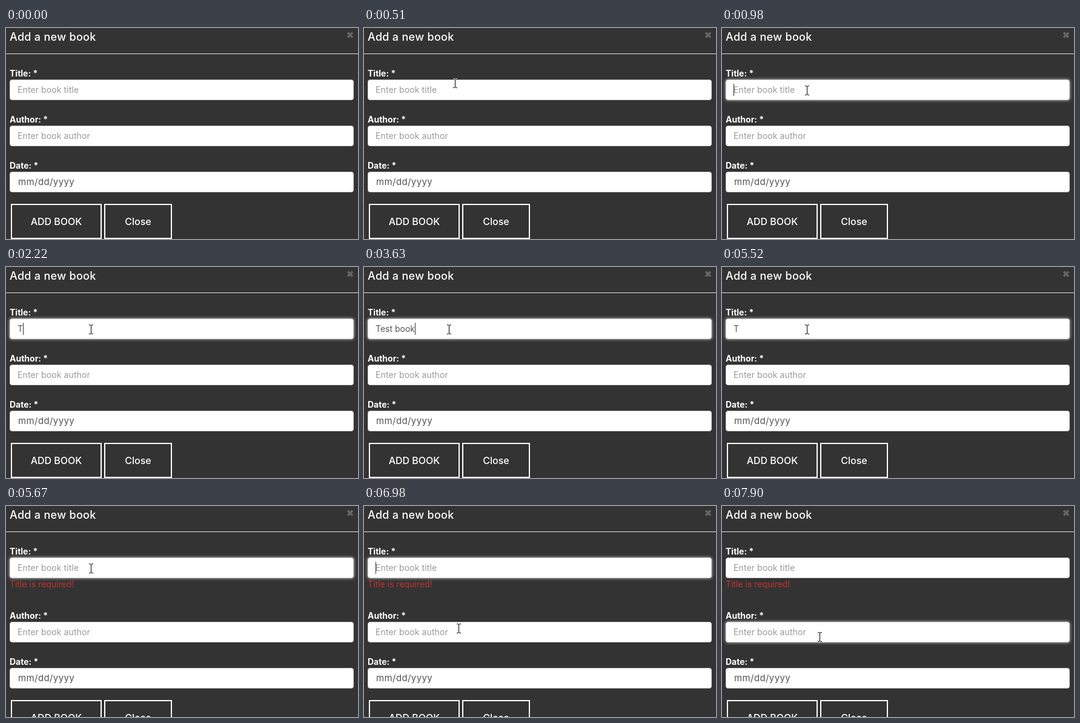
Animation, 581 px wide and 348 px high, one loop 8 s. Source, as an HTML page:

```html
<!DOCTYPE html>
<html lang="en">
<head>
<meta charset="utf-8">
<title>Add a new book</title>
<style>
  html, body { margin: 0; width: 100%; height: 100%; overflow: hidden; background: #333; }
  svg { display: block; }
  text { font: 14px Inter, sans-serif; fill: #fff; white-space: pre; }
  .heading { font-size: 18px; font-weight: 500; letter-spacing: .3px; }
  .label { font-weight: 700; }
  .hint { fill: #999; letter-spacing: .1px; }
  .value { fill: #555; }
  .date { fill: #555; font-size: 15px; letter-spacing: .4px; }
  .error { fill: #c43232; }
  .button { font-size: 16px; font-weight: 500; }
  .box { fill: #fff; stroke: #ccc; }
  .glow { fill: #fff; filter: blur(2.5px); opacity: 0; }
  .frame { fill: none; stroke: #fff; stroke-width: 2; }
  #beam { fill: none; stroke: #fff; mix-blend-mode: difference; }
</style>
</head>
<body>
<svg width="581" height="348" viewBox="0 0 581 348">
  <rect width="581" height="348" fill="#333"/>
  <text class="heading" x="6" y="21">Add a new book</text>
  <path d="M564 7.5l8 8m0-8l-8 8" stroke="#666" stroke-width="3.6"/>
  <path d="M0 42.5h581" stroke="#e5e5e5"/>
  <g id="title"></g>
  <text class="error" id="error" x="6" y="134">Title is required!</text>
  <g id="lower">
    <g id="author" transform="translate(0 76)"></g>
    <g id="date" transform="translate(0 152)"></g>
    <rect class="frame" x="9" y="291" width="148" height="56"/>
    <text class="button" x="83" y="324.5" text-anchor="middle">ADD BOOK</text>
    <rect class="frame" x="163" y="291" width="110" height="56"/>
    <text class="button" x="218" y="324.5" text-anchor="middle">Close</text>
  </g>
  <text class="value" id="typed" x="19" y="107"></text>
  <rect id="caret" width="1" height="20" fill="#333"/>
  <path id="beam" d="M-3 -7.5H-1L.5 -6.5 2 -7.5H4M.5 -7V7M-3 7.5H-1L.5 6.5 2 7.5H4"/>
  <path id="arrow" d="M.5 .5V16.5L4 13.2 6.5 18.6 8.8 17.6 6.4 12.3H11.5Z" fill="#fff" stroke="#000"/>
</svg>
<script>
const LOOP = 8000, FRAME = 77.8, START = 120;
const TITLE_CLICK = 830, AUTHOR_CLICK = 7290, EMPTIED = 5665;
const TITLE = 'Test book';
const el = id => document.getElementById(id);

function addField(id, label, hint, hintClass, hintX) {
  el(id).innerHTML = `
    <text class="label" x="6" y="80">${label}: *</text>
    <rect class="glow" x="6" y="85" width="568" height="34" rx="4"/>
    <rect class="box" x="6.5" y="85.5" width="567" height="33" rx="3.5"/>
    <text class="${hintClass}" x="${hintX}" y="107">${hint}</text>`;
}
addField('title', 'Title', 'Enter book title', 'hint', 19);
addField('author', 'Author', 'Enter book author', 'hint', 19);
addField('date', 'Date', 'mm/dd/yyyy', 'date', 20);

const titleHint = el('title').querySelector('.hint');
const titleGlow = el('title').querySelector('.glow');
const authorGlow = el('author').querySelector('.glow');

// Pointer stops: time, x, y
const stops = [
  [120, 190, 242], [509, 150, 91], [590, 147, 67], [745, 140, 103],
  [6520, 140, 103], [7130, 160, 223], [7290, 161, 216]
];
const typing = [2220, 2540, 2710, 2880, 3050, 3220, 3390, 3560, 3630];
const deleting = [4350, 4520, 4690, 4860, 5030, 5200, 5350, 5520, EMPTIED];
// Each time switches the caret on or off
const caretSwitches = [900, 1440, 1990, 4180, 4350, 5520, 5750, 6310, 6840, AUTHOR_CLICK, 7370, 7900];

const passed = (times, t) => times.filter(time => time <= t).length;
const ramp = (t, from) => Math.min(1, Math.max(0, (t - from) / 150));
const show = (node, visible) => node.setAttribute('visibility', visible ? 'visible' : 'hidden');

function pointerAt(t) {
  const next = stops.findIndex(stop => stop[0] > t);
  if (next < 1) return stops[next < 0 ? stops.length - 1 : 0].slice(1);
  const [t0, x0, y0] = stops[next - 1], [t1, x1, y1] = stops[next];
  const p = (t - t0) / (t1 - t0), k = p * p * (3 - 2 * p);
  return [x0 + (x1 - x0) * k, y0 + (y1 - y0) * k];
}

function draw(t) {
  const failed = t >= EMPTIED;
  const shift = failed ? 30 : 0;
  const length = passed(typing, t) - passed(deleting, t);
  const typed = el('typed');
  typed.textContent = TITLE.slice(0, length);
  show(titleHint, !length);
  show(el('error'), failed);
  el('lower').setAttribute('transform', `translate(0 ${shift})`);

  const caret = el('caret');
  caret.setAttribute('x', 19 + (length ? Math.round(typed.getComputedTextLength()) : 0));
  caret.setAttribute('y', t < AUTHOR_CLICK ? 92 : 198);
  show(caret, passed(caretSwitches, t) % 2);

  const step = START + Math.floor((t + 4 - START) / FRAME) * FRAME;
  titleGlow.style.opacity = .75 * ramp(step, TITLE_CLICK) * (1 - ramp(step, AUTHOR_CLICK));
  authorGlow.style.opacity = .75 * ramp(step, AUTHOR_CLICK);

  const [x, y] = pointerAt(step).map(Math.round);
  const overText = (y >= 85 && y < 119) || (y >= 161 + shift && y < 195 + shift);
  for (const id of ['beam', 'arrow']) {
    el(id).setAttribute('transform', `translate(${x} ${y})`);
    show(el(id), t >= START && overText === (id === 'beam'));
  }
}

const began = performance.now();
function tick() {
  draw((performance.now() - began) % LOOP);
  requestAnimationFrame(tick);
}
tick();
</script>
</body>
</html>
```
